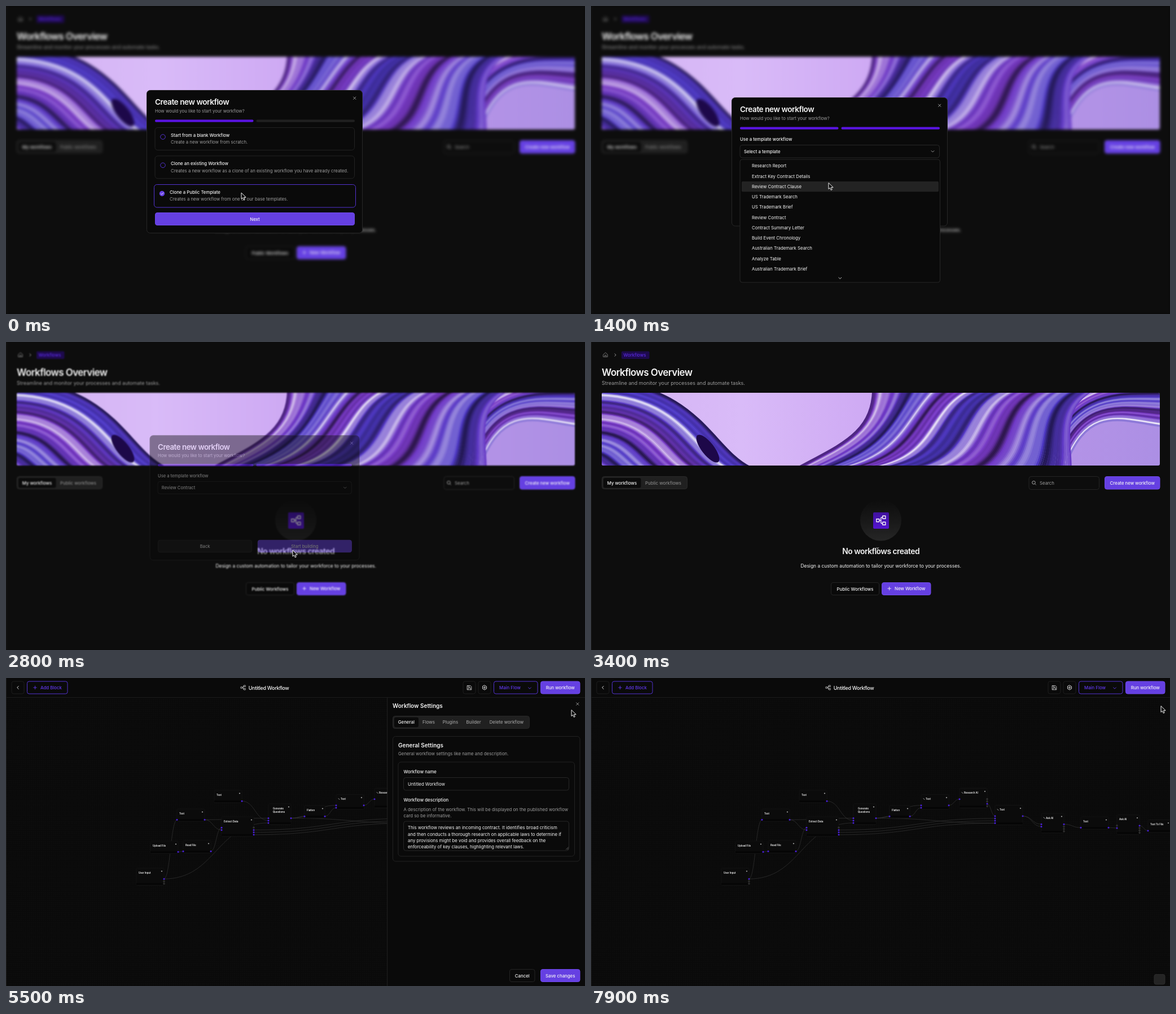
These frames come from a looping animation (1026x546 px, 8 s). An HTML page:

```html
<!DOCTYPE html>
<html lang="en">
<head>
<meta charset="utf-8">
<title>Workflow builder</title>
<style>
  html, body { margin: 0; width: 100%; height: 100%; overflow: hidden; background: #0b0b0b; }
  svg { display: block; width: 100vw; height: 100vh; font-family: Inter, sans-serif; }
</style>
</head>
<body>
<svg id="stage" viewBox="0 0 1026 546"></svg>
<script>
const DURATION = 8000;
const ACCENT = '#6540e2', EDGE = '#7049ea', VIVID = '#5a14e2', OUTLINE = '#5332d0', LINK = '#6238ee';
const LINE = '#242424', GREY = '#9c9c9c', WHITE = '#f5f5f5', DARK = '#0a0a0a';

// Drawing helpers; text is placed by its vertical centre.
const text = (x, y, s, { size = 7.82, weight = 400, fill = WHITE, anchor = 'start', track = 0 } = {}) =>
  `<text x="${x}" y="${y + size * 0.36}" font-size="${size}" font-weight="${weight}" fill="${fill}" text-anchor="${anchor}" letter-spacing="${track}em">${s}</text>`;
const label = (x, y, s, fill = WHITE) => text(x, y, s, { weight: 500, fill });
const centred = (x, y, s, fill = WHITE) => text(x, y, s, { weight: 500, fill, anchor: 'middle' });
const heading = (x, y, s, size, anchor) => text(x, y, s, { size, weight: 600, track: -0.035, anchor });
const rect = (x, y, w, h, r = 0, fill = 'none', stroke = 'none') =>
  `<rect x="${x}" y="${y}" width="${w}" height="${h}" rx="${r}" fill="${fill}" stroke="${stroke}"/>`;
const path = (d, stroke = WHITE, width = 0.9, fill = 'none') =>
  `<path d="${d}" stroke="${stroke}" stroke-width="${width}" fill="${fill}" stroke-linecap="round" stroke-linejoin="round"/>`;
const circle = (x, y, r, fill = 'none', stroke = 'none') =>
  `<circle cx="${x}" cy="${y}" r="${r}" fill="${fill}" stroke="${stroke}"/>`;
const group = (id, body) => `<g id="${id}">${body}</g>`;
const button = (x, y, w, h, s, fill = ACCENT, stroke = EDGE) =>
  rect(x + 0.5, y + 0.5, w - 1, h - 1, 3.5, fill, stroke) + centred(x + w / 2, y + h / 2 + 0.2, s);
const cross = (x, y) => path(`M${x - 2.2},${y - 2.2}l4.4,4.4m0,-4.4l-4.4,4.4`, '#bbb', 0.8);
const plus = (x, y, color) => path(`M${x - 2.8},${y}h5.6m-2.8,-2.8v5.6`, color);
const chevron = (x, y, color = '#aaa') => path(`M${x - 2.4},${y - 1.2}l2.4,2.4l2.4,-2.4`, color);
const flowIcon = (x, y, k, color) => `<g transform="translate(${x},${y}) scale(${k})">` +
  path('M-8,-2.5h5v5h-5zM3,-8h5v5h-5zM3,3h5v5h-5zM-3,0H0M3,-5.5H2Q0,-5.5 0,-3.5V3.5Q0,5.5 2,5.5H3', color, 1.4) + '</g>';

// Silky folds: fine strokes blended from one cubic curve to the next.
function silk(curves, phase, freq) {
  const steps = 90, spans = curves.length - 1;
  let out = '';
  for (let i = 0; i <= steps * spans; i++) {
    const u = Math.min(i / steps, spans - 1e-6), n = Math.floor(u);
    const [x, y, ...rest] = curves[n].map((v, j) => (v + (curves[n + 1][j] - v) * (u - n)).toFixed(1));
    const wave = Math.sin(u * freq + phase) + 0.6 * Math.sin(u * freq * 2.3 + phase * 2) + 0.4 * Math.sin(u * freq * 4.7);
    const glint = Math.max(0, wave - 1.2) * 28;
    const hue = 258 + 9 * Math.sin(u * 9 + phase);
    out += path(`M${x},${y}C${rest}`, `hsl(${hue.toFixed()},55%,${(51 + 16 * wave + glint).toFixed()}%)`, 3.5);
  }
  return out;
}
const leftFold = [[5, 210, 10, 212, 20, 220, 30, 225], [15, 70, 190, 75, 215, 190, 282, 222]];
const rightFold = [[800, 222, 830, 60, 960, 80, 1015, 70], [840, 222, 880, 110, 940, 140, 1015, 150]];
const mainFold = [[850, 222, 850, 170, 830, 110, 900, 80], [500, 222, 640, 210, 600, 110, 700, 80], [368, 222, 445, 180, 500, 160, 500, 80]];
const banner = '<g clip-path="url(#bannerClip)">' + rect(19, 90, 989, 129, 0, 'url(#lavender)') +
  '<g filter="url(#soft)">' + silk(rightFold, 1, 14) + silk(mainFold, 3, 16) + silk(leftFold, 3, 21) +
  '<ellipse cx="207" cy="189" rx="30" ry="11" transform="rotate(52 207 189)" fill="#1d0849"/></g></g>';

const page = rect(0, 0, 1026, 546, 0, '#0d0d0d') + path('M0.5,0V546', '#1c1c1c', 1) +
  path('M22,22l3.7,-3.2l3.7,3.2v4.3h-7.4zM24.4,26v-2.6h2.6v2.6', '#888', 0.8) +
  path('M42,20.8l2.2,2.2l-2.2,2.2', '#aaa') +
  rect(54, 16.5, 49.5, 13.5, 2, '#1d0a4c') + label(57.5, 23, 'Workflows', '#5a2be0') +
  heading(19, 54, 'Workflows Overview', 17.05) +
  text(19, 73, 'Streamline and monitor your processes and automate tasks.', { size: 8.98, fill: GREY }) +
  banner +
  rect(19.5, 238.5, 151, 22, 4, '#202020', '#2a2a2a') + rect(22, 241, 66.5, 17.5, 3, '#0b0b0b') +
  centred(55, 250, 'My workflows') + centred(128, 250, 'Public workflows', '#858585') +
  rect(776, 238.5, 124.5, 23, 4, 'none', LINE) +
  circle(784.5, 249.2, 2.8, 'none', '#aaa') + path('M786.6,251.4l1.8,1.8', '#aaa') +
  text(795, 250, 'Search', { fill: GREY }) + button(910, 238, 98.5, 23.5, 'Create new workflow') +
  circle(513.5, 316, 36.5, 'url(#halo)') + rect(500, 302, 28, 29, 2, 'url(#tile)') + flowIcon(513.8, 316.3, 1, WHITE) +
  heading(513.7, 371.5, 'No workflows created', 13.8, 'middle') +
  text(513.7, 396.5, 'Design a custom automation to tailor your workforce to your processes.', { size: 8.44, anchor: 'middle' }) +
  button(425, 426, 86, 23, 'Public Workflows', DARK, LINE) +
  button(515, 426, 87.5, 23, '') + plus(528.7, 437, WHITE) + label(538, 437.5, 'New Workflow');

const dialog = (y, h, steps) => rect(249.5, y + 0.5, 382, h, 6, DARK, '#272727') +
  heading(264, y + 21.5, 'Create new workflow', 13.7) +
  text(264, y + 37.5, 'How would you like to start your workflow?', { fill: GREY }) +
  rect(264, y + 52.5, 174.5, 4.3, 2, VIVID) + rect(443.5, y + 52.5, 174.5, 4.3, 2, steps > 1 ? VIVID : '#202020') +
  cross(617.7, y + 14.3);

const optionText = (x, y, title, detail) => label(x, y, title) + text(x, y + 12.1, detail, { fill: GREY });
const option = (y, title, detail) => rect(264, y + 0.5, 353.5, 40, 5, 'none', '#222') +
  circle(278, y + 17, 4.3, 'none', OUTLINE) + optionText(292, y + 14.3, title, detail);

const chooser = dialog(149, 253, 1) +
  option(215, 'Start from a blank Workflow', 'Create a new workflow from scratch.') +
  option(265.3, 'Clone an existing Workflow', 'Creates a new workflow as a clone of an existing workflow you have already created.') +
  rect(262.5, 316.5, 357, 40.5, 5, DARK, OUTLINE) + circle(276.5, 332.5, 4.7, ACCENT) + path('M274.5,332.7l1.5,1.5l2.8,-3.1') +
  optionText(290, 329.8, 'Clone a Public Template', 'Creates a new workflow from one of our base templates.') +
  button(264, 366, 354, 23, 'Next');

const template = dialog(162, 227.5, 2) + label(264, 235.7, 'Use a template workflow') +
  rect(264, 246.5, 353.5, 22.5, 4, DARK, '#272727') +
  group('unset', label(271, 257.8, 'Select a template')) + group('chosen', label(271, 257.8, 'Review Contract')) +
  chevron(605.5, 257.8) +
  button(264, 353, 172, 23, 'Back', '#171717', '#282828') + button(446, 353, 172, 23, 'Start building');

const ROW = 18.25, LIST_TOP = 274.5;
const templates = ['Research Report', 'Extract Key Contract Details', 'Review Contract Clause', 'US Trademark Search',
  'US Trademark Brief', 'Review Contract', 'Contract Summary Letter', 'Build Event Chronology',
  'Australian Trademark Search', 'Analyze Table', 'Australian Trademark Brief'];
const menu = rect(264, 272, 354.5, 218, 4, DARK, '#272727') +
  `<rect id="hover" x="267" width="349" height="${ROW}" rx="2" fill="#232323"/>` +
  templates.map((s, i) => text(285, LIST_TOP + ROW * (i + 0.5), s)).join('') + chevron(441.3, 482.5, '#ddd');

// Each block: label, left, label height, inputs, outputs, width. Ports are spaced evenly below the label.
const blocks = {
  input: ['User Input', 231, 345, 0, 3], upload: ['Upload File', 256, 297, 0, 1], read: ['Read File', 314, 296, 1, 1],
  brief: ['Text', 303, 240, 1, 1], notes: ['Text', 369, 207, 0, 1], extract: ['Extract Data', 382, 254, 2, 4, 57],
  questions: ['Generate|Questions', 465, 231, 3, 1, 40], flatten: ['Flatten', 529, 234, 1, 1, 36],
  query: ['✎ Text', 585, 214.5, 2, 1], research: ['✎ Research AI', 653, 203.5, 1, 4], report: ['✎ Text', 716, 233.5, 4, 1],
  review: ['✎ Ask AI', 798, 248, 2, 4, 40], summary: ['Text', 868, 254, 1, 1], ask: ['Ask AI', 932, 250.5, 2, 4, 40],
  file: ['Text To File', 987, 259.5, 1, 0, 40]
};
const wires = `input>brief input>questions.2 upload>read read>extract brief>questions brief>extract.1 notes>questions.1
  extract.1>report.1 extract.2>report.2 extract.3>report.3 questions>flatten questions>query questions>report.3
  flatten>query.1 query>research research.2>report report>review report>review.1 review>summary summary>ask.1 ask>file`;

function port(name, index, isOutput) {
  const [title, x, y, , , width = 49] = blocks[name];
  return [x + (isOutput ? width : 0), y + (title.includes('|') ? 17.5 : 11.2) + 4.2 * index];
}
const used = new Set();
const curves = wires.split(/\s+/).map(wire => {
  const [[x1, y1], [x2, y2]] = wire.split('>').map((end, side) => {
    const [name, index = 0] = end.split('.');
    const at = port(name, +index, side === 0);
    used.add(at.join());
    return at;
  });
  const mid = (x1 + x2) / 2;
  return path(`M${x1},${y1}C${mid},${y1} ${mid},${y2} ${x2},${y2}`, '#3c3c3c', 0.6);
}).join('');

function block([name, [title, x, y, ins, outs, w = 49]]) {
  const ports = [ins, outs].flatMap((count, side) => Array.from({ length: count }, (_, i) => port(name, i, side === 1)));
  const depth = Math.max(...ports.map(p => p[1])) - y + 3;
  const edited = title.startsWith('✎');
  const lines = title.replace('✎ ', '').split('|');
  return rect(x, y - 8, w, depth + 8, 1.5, '#0b0b0b', '#131313') + rect(x, y + depth - 4, w, 3, 0, '#050505') +
    (edited ? path(`M${x + 4},${y - 1}l2,2`, '#ccc', 0.8) : '') +
    lines.map((s, i) => text(x + (edited || lines[1] ? 8 : 4), y + i * 6.5, s, { size: 4.3, weight: 600 })).join('') +
    path(`M${x + w - 4},${y - 3.8}l1.3,1.3l-1.3,1.3l-1.3,-1.3z`, 'none', 0, '#b0b0b0') +
    ports.map(p => used.has(p.join()) ? circle(...p, 1.5, '#4a1fdc') : circle(...p, 1.2, DARK, '#444')).join('');
}
const graph = curves + Object.entries(blocks).map(block).join('');

const iconBox = x => rect(x, 6, 22, 22, 3.5, 'none', '#1e1e1e');
const editor = rect(0, 0, 1026, 546, 0, DARK) +
  group('coarse', rect(0, 35, 1026, 511, 0, 'url(#dots)')) +
  group('graph', rect(0, 35, 1026, 511, 0, 'url(#fineDots)') + graph) +
  rect(998, 525.5, 19, 17.5, 3, '#242424', '#2c2c2c') +
  rect(0, 0, 1026, 34, 0, DARK) + path('M0,34.5H1026M0.5,0V546', '#1c1c1c', 1) +
  iconBox(10) + path('M22.2,14.5l-2.5,2.5l2.5,2.5') +
  group('addBlock', rect(37.5, 6, 71.5, 22, 3.5, 'none', OUTLINE) + plus(51.5, 17, LINK) + label(61, 17, 'Add Block', LINK)) +
  group('name', flowIcon(420.3, 17, 0.5, '#ddd') + text(429.7, 17.3, 'Untitled Workflow', { size: 9, weight: 500, track: -0.035 })) +
  group('readOnly', rect(485, 10.5, 45, 12.5, 6.2, '#1d0a4c', OUTLINE) + text(507.6, 17, 'Read Only', { size: 6.9, fill: '#7650f0', anchor: 'middle' })) +
  iconBox(810) + group('save', path('M817.5,13.5h5.5l1.8,1.8v5.5h-7.3zM819,20.5v-3h4v3M819,13.7v2h3', '#ddd', 0.8)) +
  iconBox(837) + path('M848,13l3.5,2v4l-3.5,2l-3.5,-2v-4z', '#ddd', 1) + circle(848, 17, 1.4, 'none', '#ddd') +
  rect(864.5, 6, 77.5, 22, 3.5, 'none', OUTLINE) + label(874, 17, 'Main Flow', LINK) + chevron(928, 18, LINK) +
  button(947, 5.5, 70.5, 23, 'Run workflow');

const description = ['This workflow reviews an incoming contract. It identifies broad criticism',
  'and then conducts a thorough research on applicable laws to determine if',
  'any provisions might be void and provides overall feedback on the',
  'enforceability of key clauses, highlighting relevant laws.'];
const tabBar = width => rect(685.5, 67.5, width, 22, 4, '#202020', '#282828');
const panel = rect(676, 35, 351, 512, 0, DARK) + path('M675.7,35V546', '#222', 1) +
  text(685, 49.5, 'Workflow Settings', { size: 10, weight: 600 }) + cross(1012.8, 46) +
  group('tabsShort', tabBar(166.5)) + group('tabsFull', tabBar(242) + centred(887, 78.3, 'Delete workflow', GREY)) +
  rect(688, 69.7, 43, 17.5, 3, '#0b0b0b') + centred(709.3, 78.3, 'General') +
  centred(749, 78.3, 'Flows', GREY) + centred(787.5, 78.3, 'Plugins', GREY) + centred(828.6, 78.3, 'Builder', GREY) +
  rect(685.5, 103.5, 331.5, 221.5, 5, 'none', '#222') +
  text(695, 119.5, 'General Settings', { size: 10, weight: 600 }) +
  text(695, 134, 'General workflow settings like name and description.', { fill: GREY }) +
  rect(695, 149, 312.5, 167, 5, 'none', '#222') + label(704.5, 166, 'Workflow name') +
  label(704.5, 216, 'Workflow description') +
  text(704.5, 232.7, 'A description of the workflow. This will be displayed on the published workflow', { fill: GREY }) +
  text(704.5, 244.2, 'card so be informative.', { fill: GREY }) +
  group('fields', rect(704.5, 176.5, 293, 22.5, 4, 'none', '#272727') + text(712, 188.3, 'Untitled Workflow') +
    rect(704.5, 254, 293, 52, 4, 'none', '#272727') +
    description.map((s, i) => text(712, 265.3 + 11.45 * i, s)).join('') + path('M992.5,304l4,-4m-1.5,4l1.5,-1.5', '#999', 0.6)) +
  group('actions', button(892, 516, 45.5, 23, 'Cancel', DARK, LINE) + button(947, 516, 70.5, 23, 'Save changes'));

const stage = document.getElementById('stage');
const gradient = (id, direction, ...colors) => `<linearGradient id="${id}" ${direction}>` +
  colors.map((c, i) => `<stop offset="${i / (colors.length - 1)}" stop-color="${c}"/>`).join('') + '</linearGradient>';
const dots = (id, gap, r, fill) =>
  `<pattern id="${id}" width="${gap}" height="${gap}" patternUnits="userSpaceOnUse">${circle(gap / 2, gap / 2, r, fill)}</pattern>`;
const DOWN = 'x2="0" y2="1"';
stage.innerHTML = '<defs>' +
  `<clipPath id="bannerClip">${rect(19, 90, 989, 129, 3, '#000')}</clipPath>` +
  '<filter id="soft"><feGaussianBlur stdDeviation="0.7"/></filter>' +
  gradient('lavender', '', '#d3b2f2', '#d9bbf8', '#cda8f3', '#b795e8', '#ac8fe4') +
  gradient('halo', DOWN, '#0d0d0d', '#181818', '#262626') + gradient('tile', DOWN, '#3f129c', '#5514d0') +
  dots('dots', 10.26, 0.6, '#252525') + dots('fineDots', 3.6, 0.45, '#171717') + '</defs>' +
  group('page', page) +
  group('dialog', group('chooser', chooser) + group('template', template)) + group('menu', menu) +
  group('editor', editor + group('panel', panel)) +
  group('cursor', group('ring', circle(1, 0.5, 14.2, 'rgba(255,255,255,.08)', '#c8c8c8') + circle(1, 0.5, 12.8, 'none', '#555')) +
    group('arrow', path('M0,0V10.6L2.5,8.4L4.3,12.4L6.2,11.6L4.5,7.7H7.8Z', WHITE, 1, DARK)) +
    group('beam', path('M-1.8,-5Q0,-5 0,-3.5V4Q0,5.5 -1.8,5.5M1.8,-5Q0,-5 0,-3.5M0,4Q0,5.5 1.8,5.5', '#bbb', 0.9)));

const el = Object.fromEntries([...stage.querySelectorAll('[id]')].map(e => [e.id, e]));
const show = (id, on) => { el[id].style.display = on ? '' : 'none'; };
const move = (id, x, y) => el[id].setAttribute('transform', `translate(${x.toFixed(2)},${y.toFixed(2)})`);
const ease = k => k * k * (3 - 2 * k);
const progress = (t, start, end) => ease(Math.min(1, Math.max(0, (t - start) / (end - start))));

// Pointer moves: start, end, and where the tip arrives.
const home = [417, 331.5];
const moves = [[50, 300, 430, 373], [640, 1000, 424, 258], [1200, 1600, 418, 369], [2000, 2500, 508, 369.5],
  [4800, 5100, 683, 217], [5220, 5500, 1002, 57], [5500, 6100, 1010, 50]];
const clicks = [300, 1100, 1900, 2600, 7000];

const pointer = t => moves.reduce(([x, y], [start, end, toX, toY]) => {
  const k = progress(t, start, end);
  return [x + (toX - x) * k, y + (toY - y) * k];
}, home);

function render(t) {
  const [x, y] = pointer(t);
  const closing = progress(t, 2680, 2900);
  const inEditor = t >= 3800, ready = t >= 4700;

  show('page', !inEditor);
  el.page.style.filter = closing < 1 ? `blur(${(2.4 * (1 - closing)).toFixed(2)}px)` : 'none';
  show('dialog', closing < 1);
  el.dialog.style.opacity = 1 - closing;
  const zoom = 1 - 0.05 * closing;
  el.dialog.setAttribute('transform', `translate(${440.5 * (1 - zoom)},${276 * (1 - zoom)}) scale(${zoom})`);
  show('chooser', t < 400);
  show('template', t >= 400);
  show('unset', t < 2000);
  show('chosen', t >= 2000);

  show('menu', t >= 1200 && t < 2000);
  const row = Math.floor((y - LIST_TOP) / ROW);
  show('hover', row >= 0 && row < templates.length);
  el.hover.setAttribute('y', LIST_TOP + Math.max(0, row) * ROW);

  show('editor', inEditor);
  for (const id of ['graph', 'tabsFull']) show(id, ready);
  for (const id of ['coarse', 'readOnly', 'tabsShort']) show(id, !ready);
  for (const id of ['addBlock', 'save', 'fields', 'actions']) el[id].style.opacity = ready ? 1 : 0.45;
  move('name', ready ? 0 : -27.7, 0);
  const shut = 1 - progress(t, 3930, 4475) + progress(t, 7050, 7400);
  show('panel', shut < 1);
  move('panel', 352 * shut, 0);

  move('cursor', x, y);
  const overText = t >= 2900 && !inEditor;
  show('arrow', !overText);
  show('beam', overText);
  show('ring', clicks.some(c => t >= c - 50 && t < c + 150));
}

function tick(now) {
  render(now % DURATION);
  requestAnimationFrame(tick);
}
render(0);
requestAnimationFrame(tick);
</script>
</body>
</html>
```
